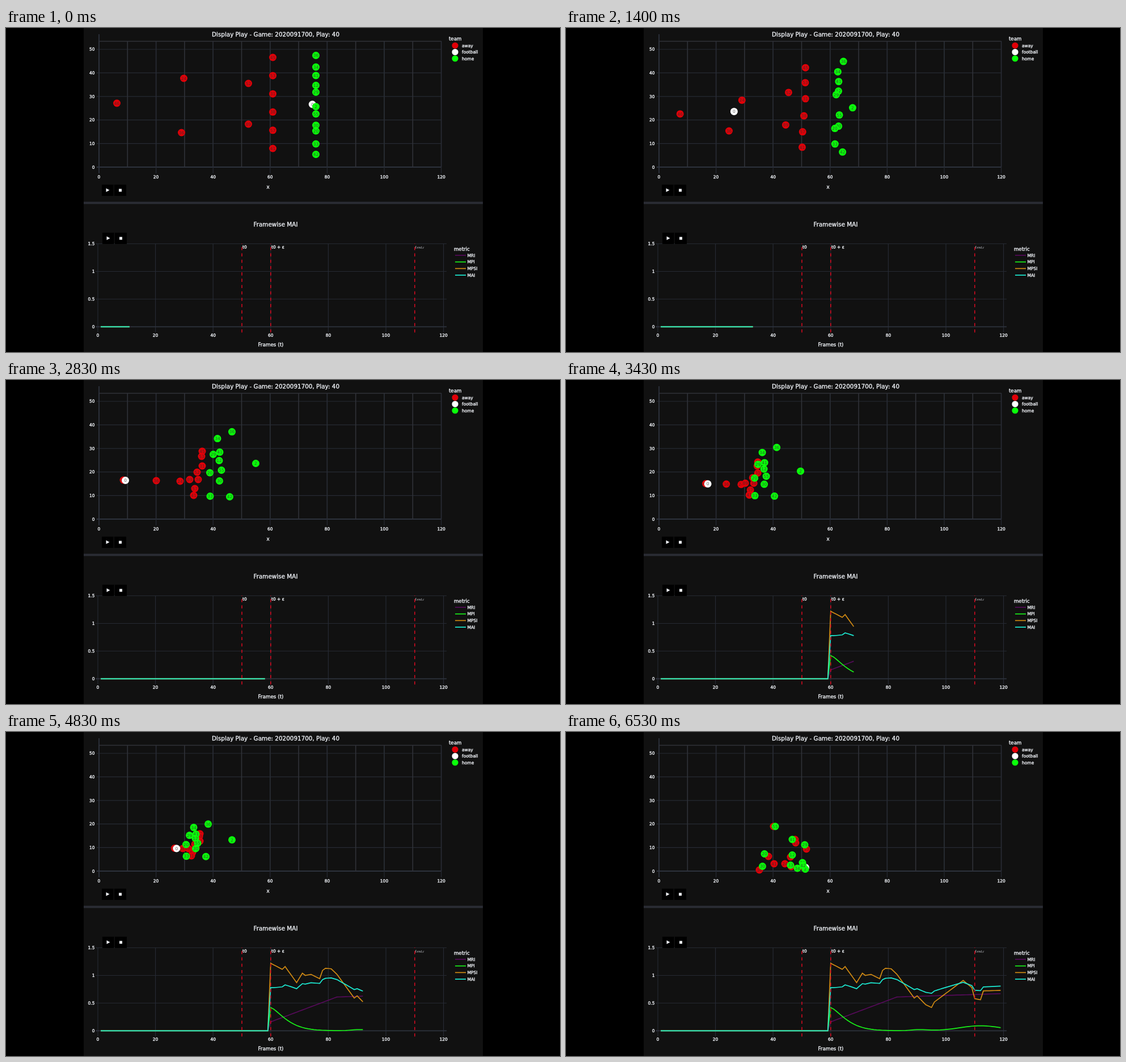
Recreate the animation shown at these times as an HTML page with a canvas. Size 977x573 px, loop 6.73 s.

```html
<!DOCTYPE html>
<html lang="en">
<head>
<meta charset="utf-8">
<title>Play display</title>
<style>
html, body { margin: 0; width: 100%; height: 100%; overflow: hidden; background: #000; }
canvas { display: block; }
</style>
</head>
<body>
<canvas id="stage" width="977" height="573"></canvas>
<script>
const ctx = document.getElementById('stage').getContext('2d');
const RED = '#e00008', WHITE = '#fff', GREEN = '#0aff0a', INK = '#f2f5fa';
const GRID = '#262a33', AXIS = '#2d323d', YARD = '#303238';
const LOOP = 6730, MEET = 2830, HUDDLE = 4130, SHIFT = 4830, END = 6530;

const mix = (a, b, u) => a + (b - a) * u;
const clamp = u => Math.max(0, Math.min(1, u));

// Piecewise linear value at t through [time, value] points.
function lerpAt(points, t) {
  let i = 0;
  while (i < points.length - 2 && t >= points[i + 1][0]) i++;
  const [[t0, a], [t1, b]] = points.slice(i, i + 2);
  return mix(a, b, clamp((t - t0) / (t1 - t0)));
}

// Smooth value at t through [time, value] points.
function curveAt(points, t) {
  let i = 0;
  while (i < points.length - 2 && t >= points[i + 1][0]) i++;
  const slope = k => {
    const a = points[Math.max(k - 1, 0)], b = points[Math.min(k + 1, points.length - 1)];
    return (b[1] - a[1]) / (b[0] - a[0]);
  };
  const [[t0, a], [t1, b]] = points.slice(i, i + 2);
  const span = t1 - t0, u = (t - t0) / span, w = 1 - u;
  return w * w * ((1 + 2 * u) * a + u * span * slope(i)) + u * u * ((3 - 2 * u) * b - w * span * slope(i + 1));
}

// How each unit runs: easing powers up to the meeting point, then where it closes in.
const closeY = y => 183 + (y - 160) / 2;
const returners = { color: RED, powX: 1, powY: 1.2, closeX: x => mix(x, 314, .75) };
const blockers = { color: RED, powX: 1.35, powY: 2, closeX: x => x - 14 };
const kickers = { color: GREEN, powX: 1.35, powY: 2, closeX: x => x - 52 };

const players = [];
function add(unit, label, start, meet, end) {
  const near = [unit.closeX(meet[0]), closeY(meet[1])];
  const path = k => [[MEET, meet[k]], [HUDDLE, near[k]], [SHIFT, near[k] + [10, 14][k]], [END, end[k]]];
  const player = { unit, label, start, meet, xs: path(0), ys: path(1) };
  players.push(player);
  return player;
}
const front = (row, label, meet, end) => add(blockers, label, [470.5, 52 + row * 32.2], meet, end);
const kicker = (label, y, meet, end) => add(kickers, label, [546.5, y], meet, end);

const carrier = add(returners, 46, [195.5, 133], [207, 177], [419, 239]);
add(returners, 24, [313.5, 89], [307, 179], [386, 233]);
add(returners, 36, [309.5, 185], [265, 178], [341, 244]);
add(blockers, 52, [427.5, 98], [337, 163], [404, 190]);
add(blockers, 89, [427.5, 170], [324, 176], [397, 238]);
front(0, 45, [346, 126], [396, 221]);
front(1, 53, [345, 135], [424, 207]);
front(2, 31, [346, 152], [405, 196]);
front(3, 38, [339, 176], [366, 167]);
front(4, 57, [333, 192], [357, 220]);
front(5, 41, [331, 204], [367, 233]);
kicker(36, 48.5, [398.5, 91.5], [417, 231]);
kicker(34, 69, [373, 103.5], [408, 241]);
kicker(41, 84, [377, 127.5], [399, 190]);
kicker(12, 101.5, [376, 142.5], [399, 217.5]);
kicker(29, 113.5, [365.5, 131.5], [421, 199.5]);
kicker(2, 139, [440.5, 147.5], [422, 242.5]);
kicker(55, 152, [380, 159.5], [369, 167]);
kicker(30, 172, [376.5, 178.5], [346.5, 237.5]);
kicker(20, 182, [359.5, 164], [350, 215.5]);
kicker(33, 205, [360, 205.5], [396, 235.5]);
kicker(42, 223.5, [394.5, 206.5], [418, 236]);

function place({ unit, start, meet, xs, ys }, t) {
  const u = t / MEET;
  return u < 1
    ? [mix(start[0], meet[0], u ** unit.powX), mix(start[1], meet[1], u ** unit.powY)]
    : [curveAt(xs, t), curveAt(ys, t)];
}

// The kick slows down into the carrier's hands, then stays there.
function placeBall(t) {
  const u = 1 - (1 - clamp(t / MEET)) ** 1.9;
  const [x, y] = place(carrier, t);
  return [mix(540.5, x + 3.5, u), mix(135, y + .5, u)];
}

const bump = (t, mid, width) => Math.exp(-(((t - mid) / width) ** 2));
const mri = t => .16 + .45 * clamp((t - 60) / 23) + .06 * clamp((t - 83) / 36);
const mpi = t => .42 * Math.exp(-(((t - 60) / 6.8) ** 1.4)) + .02 * bump(t, 91, 4) + .09 * bump(t, 112, 10);
const turns = [[60, 1.22], [64, 1.11], [65, 1.16], [69, .87], [71, 1.04], [72, 1], [74, 1.02], [77, .94], [78, 1.09],
  [79, 1.13], [81, 1.12], [83, 1.02], [89, .59], [90, .63], [93, .47], [95, .42], [96, .52], [106, .91], [109, .78],
  [110, .58], [112, .56], [113, .72], [119, .73]];
const mpsi = t => lerpAt(turns, t);
const mai = t => .32 + .29 * mri(t) - .24 * mpi(t) + .42 * mpsi(t);
const metrics = [['MRI', '#560a5a', mri], ['MPI', '#18f018', mpi], ['MPSI', '#d38b12', mpsi], ['MAI', '#1cebd3', mai]];
const counts = [[0, 11], [830, 24], [MEET, 58], [HUDDLE, 81], [SHIFT, 92], [END, 119]];

const fieldX = v => 164 + v * 5.03;
const fieldY = v => 246 - v * 4.165;
const chartX = v => 162 + v * 5.08;
const chartY = v => 528.3 - v * 97.8;

function box(x, y, w, h, color) {
  ctx.fillStyle = color;
  ctx.fillRect(x, y, w, h);
}

function line(points, color, width = 1.2, dash = []) {
  ctx.strokeStyle = color;
  ctx.lineWidth = width;
  ctx.setLineDash(dash);
  ctx.beginPath();
  points.forEach(([x, y]) => ctx.lineTo(x, y));
  ctx.stroke();
}

function text(str, x, y, size = 7.5, align = 'left', { color = INK, font = '"DejaVu Sans", Verdana, sans-serif', style = '', weight = .35 } = {}) {
  ctx.font = `${style} ${size}px ${font}`;
  ctx.textAlign = align;
  ctx.fillStyle = ctx.strokeStyle = color;
  ctx.fillText(str, x, y + size * .365);
  if (!weight) return;
  ctx.lineWidth = weight;
  ctx.setLineDash([]);
  ctx.strokeText(str, x, y + size * .365);
}

function dot(x, y, r, color) {
  ctx.fillStyle = color;
  ctx.beginPath();
  ctx.arc(x, y, r, 0, 7);
  ctx.fill();
}

function marker([x, y], color, label) {
  dot(x, y, 6.5, color);
  text(label, x, y, 7.5, 'center', { color: 'rgba(45,45,45,.75)', weight: 0 });
}

function buttons(x, y) {
  box(x, y, 20.5, 20, '#000');
  box(x + 22, y, 21, 20, '#000');
  ctx.fillStyle = INK;
  ctx.beginPath();
  ctx.moveTo(x + 7.5, y + 6.5);
  ctx.lineTo(x + 13.5, y + 9.7);
  ctx.lineTo(x + 7.5, y + 13);
  ctx.fill();
  box(x + 30, y + 7.5, 5, 5, INK);
}

function drawField() {
  for (let v = 0; v <= 50; v += 10) {
    const y = fieldY(v);
    line([[160, y], [767.5, y]], v ? GRID : AXIS, v ? 1.2 : 1.8);
    text(v, 156.5, y, 7.5, 'right');
  }
  for (let v = 0; v <= 120; v += 10) {
    const x = fieldX(v);
    line([[x, 23.5], [x, 246]], YARD, 1.6);
    if (v % 20) continue;
    line([[x, v ? 23 : 11], [x, 257]], v ? GRID : AXIS, v ? 1.2 : 1.8);
    text(v, x, 263.5, 7.5, 'center');
  }
  line([[164, 23.5], [767.5, 23.5]], YARD, 1.6);
  text('Display Play - Game: 2020091700, Play: 40', 475.5, 11.5, 10.4, 'center');
  text('x', 462, 281, 8.8, 'center');
  text('team', 781, 19, 8.6);
  [['away', RED], ['football', WHITE], ['home', GREEN]].forEach(([name, color], i) => {
    dot(792, 31 + i * 11.5, 5.6, color);
    text(name, 804, 31 + i * 11.5);
  });
  buttons(169, 277);
}

function drawChart() {
  for (let v = 0; v <= 120; v += 20) {
    const x = chartX(v);
    line([[x, 381], [x, 538]], GRID);
    text(v, x, 543.5, 7.5, 'center');
  }
  for (let v = 0; v <= 1.5; v += .5) {
    const y = chartY(v);
    line([[158, y], [777, y]], v ? GRID : AXIS, v ? 1 : 1.8);
    text(v, 156.5, y, 7.5, 'right');
  }
  text('Framewise MAI', 475.5, 347.5, 10.4, 'center');
  text('Frames (t)', 467, 560, 8.8, 'center');
  text('metric', 790, 390.5, 8.6);
  metrics.forEach(([name, color], i) => {
    const y = 402 + i * 11.7;
    line([[792, y], [811, y]], color, 1.7);
    text(name, 813.5, y);
  });
  buttons(170, 362);
}

function drawMetrics(count) {
  for (const [, color, value] of metrics) {
    const points = [[chartX(1), chartY(0)], [chartX(Math.min(count, 59)), chartY(0)]];
    for (let v = 60; v <= count; v++) points.push([chartX(v), chartY(value(v))]);
    line(points, color, 1.7);
  }
  for (const v of [50, 60, 110])
    line([[chartX(v), 538.5], [chartX(v), 381]], '#cf0a20', 1.6, [5.6, 5.6]);
  text('t0', 417, 387.5);
  text('t0 + ε', 468, 387.5);
  const math = { color: '#c8cbd0', font: '"Liberation Serif", serif', style: 'italic', weight: 0 };
  text('t', 721.5, 386.5, 8.5, 'left', math);
  text('end,c', 724.5, 388, 6, 'left', math);
}

function draw(now) {
  const t = Math.min(now % LOOP, END);
  box(0, 0, 977, 573, '#000');
  box(137, 0, 704, 573, '#111');
  box(137, 307.3, 704, 4, '#2a2c34');
  drawField();
  drawChart();
  drawMetrics(Math.floor(lerpAt(counts, t) + 1e-6));

  const show = color => players.filter(p => p.unit.color === color)
    .forEach(p => marker(place(p, t), color, p.label));
  show(RED);
  marker(placeBall(t), WHITE, 0);
  show(GREEN);
  requestAnimationFrame(draw);
}
requestAnimationFrame(draw);
</script>
</body>
</html>
```
